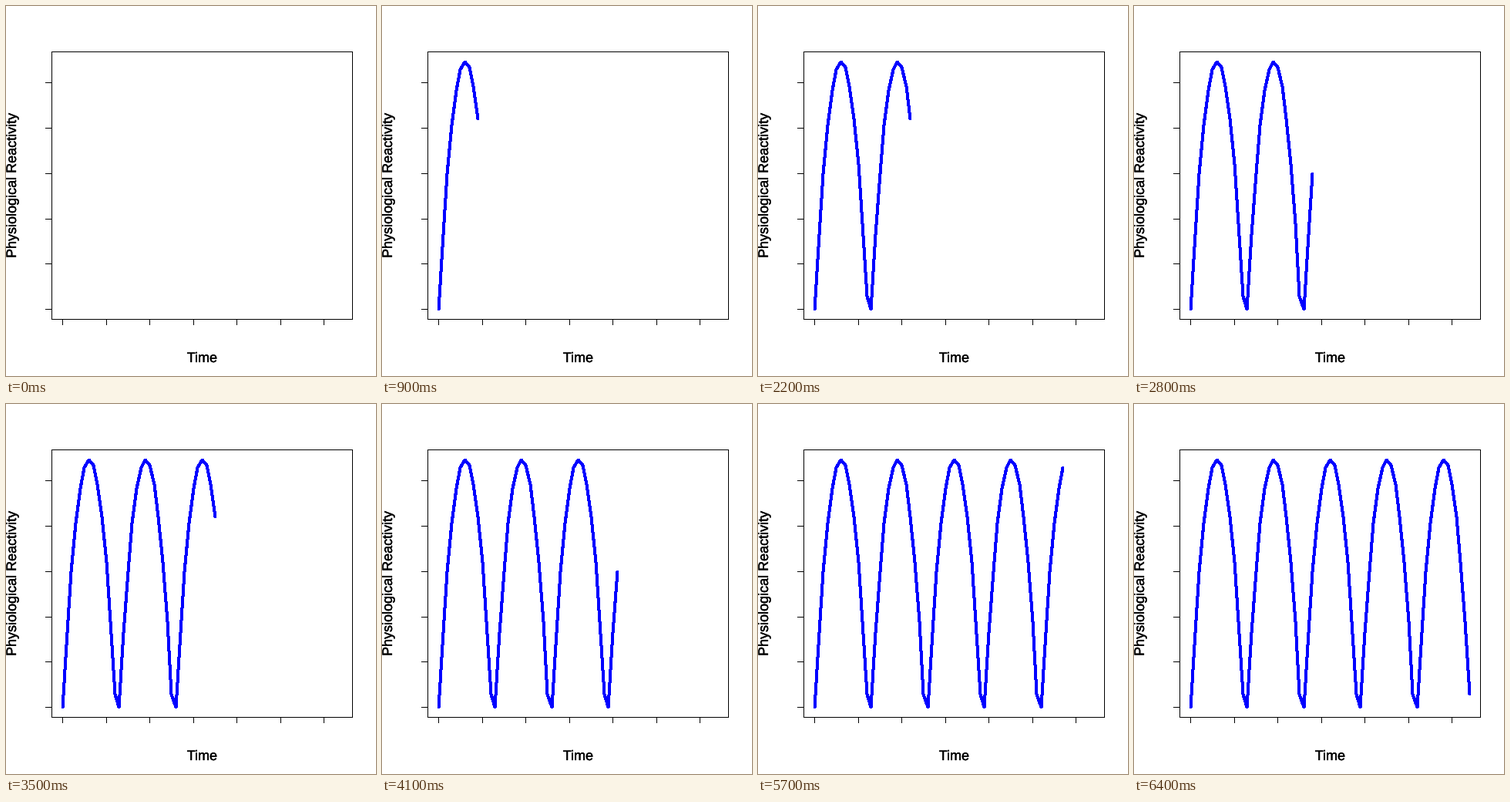
These frames come from a looping animation (480x480 px, 6500 ms). A matplotlib script:

```python
import numpy as np
import matplotlib.pyplot as plt
from matplotlib import patheffects
from matplotlib.animation import FuncAnimation

SIZE, DPI = 480, 80
FRAMES, STEP_MS = 65, 100
PERIOD = 13
PT = 72 / DPI  # points per pixel

LEFT, RIGHT, TOP, BOTTOM = 59, 449, 59, 406
X0, DX = 73.51, 5.653
Y0, TICK_DY = 393.69, 58.77

plt.rcParams["font.family"] = "Liberation Sans"
plt.rcParams["path.simplify"] = False

fig = plt.figure(figsize=(SIZE / DPI, SIZE / DPI), dpi=DPI, facecolor="white")
ax = fig.add_axes([0, 0, 1, 1])
ax.set_xlim(0, SIZE)
ax.set_ylim(SIZE, 0)
ax.axis("off")


def thin(xs, ys):
    """One-pixel crisp black line through pixel centres."""
    ax.plot(np.array(xs) + 0.5, np.array(ys) + 0.5, color="black",
            lw=PT, antialiased=False, snap=False,
            solid_capstyle="projecting", solid_joinstyle="miter")


def label(x, y, text, **style):
    # A hairline outline gives the slightly heavy screen type
    heavy = patheffects.withStroke(linewidth=0.4 * PT, foreground="black")
    ax.text(x, y, text, fontsize=18 * PT, color="black",
            path_effects=[heavy], **style)


# Plot frame and unlabelled ticks
thin([LEFT, RIGHT, RIGHT, LEFT, LEFT], [TOP, TOP, BOTTOM, BOTTOM, TOP])
for k in range(7):
    x = int(X0 + 10 * DX * k)
    thin([x, x], [BOTTOM, BOTTOM + 7])
for k in range(6):
    y = int(Y0 - TICK_DY * k)
    thin([LEFT - 8, LEFT], [y, y])

label(254.4, 462, "Time", ha="center", va="baseline")
label(17, 232.5, "Physiological Reactivity", rotation=90,
      ha="right", va="center")

# Repeating parabolic response, on whole pixels
n = np.arange(FRAMES)
phase = n % PERIOD
xs = np.floor(X0 + DX * n) + 0.5
ys = np.floor(Y0 - 8.69 * phase * (12.163 - phase)) + 0.5

curve, = ax.plot([], [], color="#0000ff", lw=3 * PT, antialiased=False,
                 snap=False, solid_capstyle="round", solid_joinstyle="round")


def update(i):
    count = i + 1 if i > 0 else 0
    curve.set_data(xs[:count], ys[:count])
    return curve,


anim = FuncAnimation(fig, update, frames=FRAMES, interval=STEP_MS,
                     init_func=lambda: update(0), repeat=True,
                     repeat_delay=0, blit=False)
plt.show()
```
